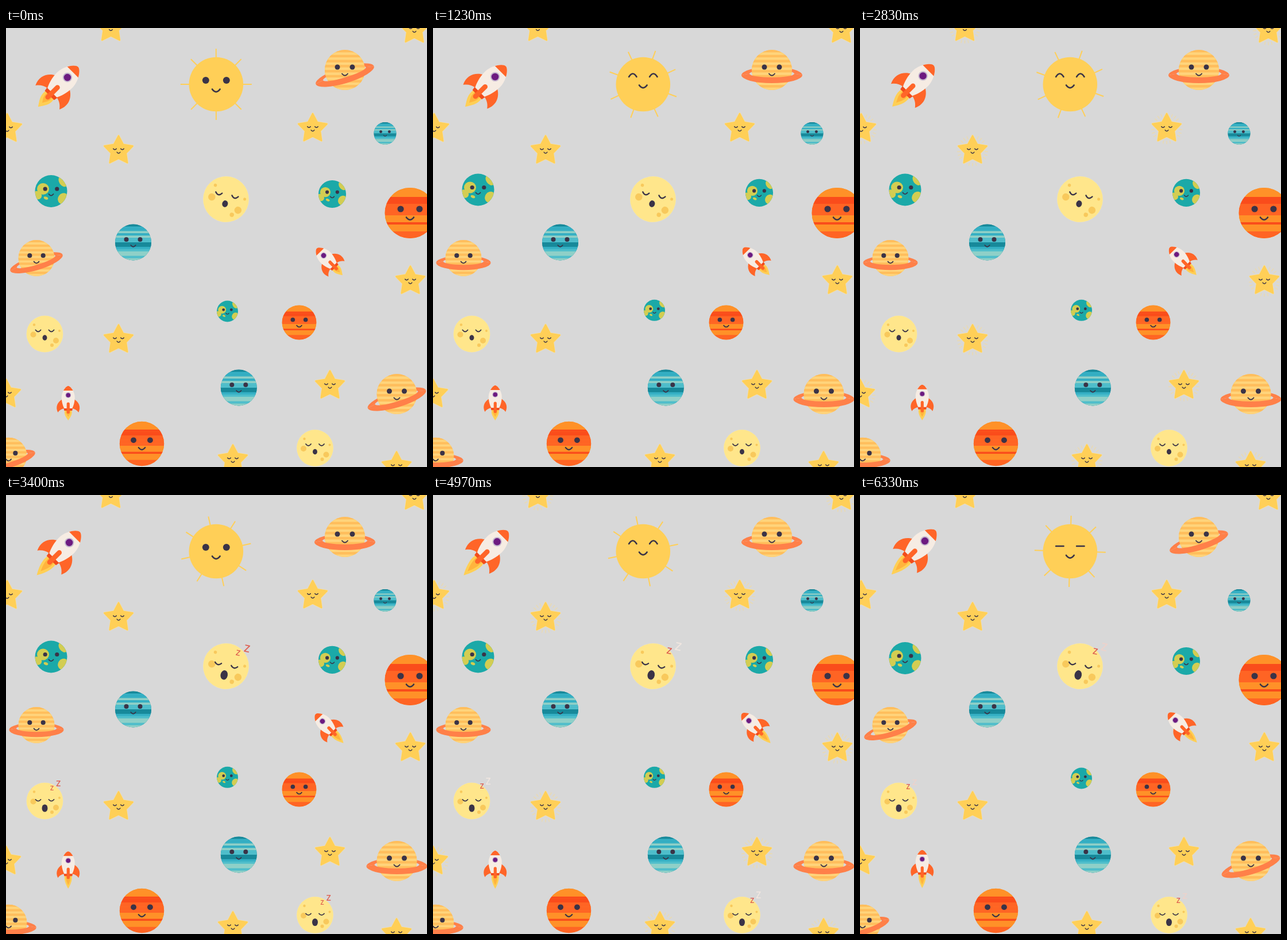
These frames come from a looping animation (733x764 px, 6.36 s). An HTML page with a canvas:

```html
<!DOCTYPE html>
<html>
<head>
<meta charset="utf-8">
<style>
html, body { margin: 0; width: 100%; height: 100%; overflow: hidden; background: #d8d8d8; }
canvas { display: block; }
</style>
</head>
<body>
<canvas id="stage" width="733" height="764"></canvas>
<script>
const c = document.getElementById('stage').getContext('2d');
const LOOP = 6360, TAU = Math.PI * 2, DEG = Math.PI / 180;
const INK = '#3a3347', YELLOW = '#ffcf57', ORANGE = '#ff6528';

// Smooth step from 0 to 1 between two times
function ramp(t, from, to) {
  const k = Math.min(1, Math.max(0, (t - from) / (to - from)));
  return k * k * (3 - 2 * k);
}
const pulse = (t, a, b, d, e) => ramp(t, a, b) - ramp(t, d, e);

function at(x, y, scale, angle, draw) {
  c.save();
  c.translate(x, y);
  c.rotate(angle * DEG);
  c.scale(scale, scale);
  draw();
  c.restore();
}

function oval(x, y, rx, ry, color, tilt = 0) {
  c.fillStyle = color;
  c.beginPath();
  c.ellipse(x, y, rx, ry, tilt, 0, TAU);
  c.fill();
}
const dot = (x, y, r, color) => oval(x, y, r, r, color);

function fillPath(d, color) {
  c.fillStyle = color;
  c.fill(new Path2D(d));
}

function line(x0, y0, x1, y1, color, width, cap = 'butt') {
  c.strokeStyle = color;
  c.lineWidth = width;
  c.lineCap = cap;
  c.beginPath();
  c.moveTo(x0, y0);
  c.lineTo(x1, y1);
  c.stroke();
}

function spoke(angle, from, to, color, width) {
  const x = Math.sin(angle), y = -Math.cos(angle);
  line(from * x, from * y, to * x, to * y, color, width);
}

// Positive depth is a smile, negative an arch
function curve(x, y, half, depth, width) {
  c.strokeStyle = INK;
  c.lineWidth = width;
  c.lineCap = 'round';
  c.beginPath();
  c.moveTo(x - half, y);
  c.quadraticCurveTo(x, y + 2 * depth, x + half, y);
  c.stroke();
}

function face(dx, y, r, smileY, half, width) {
  dot(-dx, y, r, INK);
  dot(dx, y, r, INK);
  curve(0, smileY, half, half * 0.65, width);
}

function globe(r, base, paint) {
  c.save();
  dot(0, 0, r, base);
  c.clip();
  paint();
  c.restore();
}

// One letter per stripe, all stripes equally high
function striped(r, letters, palette) {
  globe(r, palette[letters[0]], () => {
    const h = 2 * r / letters.length;
    [...letters].forEach((key, i) => {
      c.fillStyle = palette[key];
      c.fillRect(-r, i * h - r, 2 * r, h + 0.3);
    });
  });
}

function star(glow) {
  c.beginPath();
  for (let i = 0; i < 10; i++) {
    const a = i * TAU / 10, r = i % 2 ? 13.5 : 26;
    c.lineTo(r * Math.sin(a), -r * Math.cos(a));
  }
  c.closePath();
  c.lineJoin = 'round';
  c.strokeStyle = '#f6dfa6';
  c.lineWidth = 3.8;
  c.stroke();
  c.strokeStyle = c.fillStyle = YELLOW;
  c.lineWidth = 2.4;
  c.stroke();
  c.fill();
  curve(-6.5, -3.5, 2.8, 1.7, 1.4);
  curve(6.5, -3.5, 2.8, 1.7, 1.4);
  curve(0, 2.6, 2.8, 1.9, 1.5);
  c.globalAlpha = glow * 0.65;
  for (let i = 0; i < 5; i++)
    for (const off of [-14, 0, 14]) spoke((36 + 72 * i + off) * DEG, 21.5, 27, '#f7dc94', 1.3);
  c.globalAlpha = 1;
}

function sun(t) {
  for (let i = 0; i < 8; i++) spoke(i * TAU / 8 - t / LOOP * TAU, 46, 62, YELLOW, 2);
  dot(0, 0, 47.3, YELLOW);
  const joy = pulse(t % 3180, 980, 1120, 3085, 3180);
  const lift = Math.max(0, (joy - 0.3) / 0.7);
  for (const x of [-18, 18]) {
    if (joy < 0.2) oval(x, -7, 6, 6 - joy * 25, INK);
    else curve(x, -9 - 4 * lift, 6.7, -5.5 * lift, 2.6);
  }
  curve(0, 8.5 - 7 * joy, 6.8, 4.6, 2.7);
}

function saturn(tilt) {
  const halfRing = from => at(0, 9, 1, tilt, () => {
    c.fillStyle = '#ff8049';
    c.beginPath();
    c.ellipse(0, 0, 53, 14, 0, from, from + Math.PI);
    c.ellipse(0, -2.5, 39, 6.5, 0, from + Math.PI, from, true);
    c.fill();
  });
  halfRing(Math.PI);
  striped(35, 'gs'.repeat(8), { g: '#ffbe5c', s: '#ffd47b' });
  halfRing(0);
  face(13, -5, 4.5, 6.5, 5, 2);
}

function earth() {
  globe(28, '#1ba9a8', () => {
    const land = (...shape) => oval(...shape.slice(0, 4), '#d3cd52', shape[4]);
    land(-14, -4, 10.5, 10, 0);
    land(-24, 7, 8, 7, 0.6);
    land(-9, 12, 4, 2.4, 0.4);
    land(21, -17, 7, 10, -0.6);
    land(21, 13, 9, 10, 0.6);
  });
  face(10.3, -4, 3.6, 5, 4, 1.8);
}

function uranus() {
  striped(31.5, 'dbblblccddbcllcl', { d: '#17899a', b: '#35b0c4', l: '#8fd0c8', c: '#4fbecb' });
  face(12, -5, 4, 5, 4.2, 1.8);
}

function jupiter() {
  striped(44, 'oooorrrbbbbbooorooobbb', { o: '#ff9128', r: '#fa4c1b', b: '#ff6424' });
  face(16.4, -7, 5.6, 7.5, 6.5, 2.6);
}

const mix = (a, b, k) => `rgb(${a.map((v, i) => Math.round(v + (b[i] - v) * k))})`;

function snore(age) {
  const k = (age - 430) / 770;
  if (k < 0 || k > 1) return;
  c.globalAlpha = pulse(age, 400, 580, 1160, 1210);
  c.fillStyle = mix([221, 92, 78], [240, 231, 225], ramp(age, 950, 1150));
  c.font = `600 ${9 + 7 * k}px "Open Sans", sans-serif`;
  c.textAlign = 'center';
  c.textBaseline = 'middle';
  c.fillText('Z', 7.5 + 23 * k, -17 - 17 * k);
  c.globalAlpha = 1;
}

function moon(t) {
  const phase = t % 1400, open = pulse(phase, 200, 400, 850, 1000);
  dot(0, 0, 32, '#f8e6a6');
  dot(0, 0, 31.4, '#ffe68b');
  for (const [x, y, r] of [[-20, 1, 5], [19.5, 11.5, 5], [12.5, 19.5, 3], [-18.5, -16, 2.2], [25.5, -5.5, 2]])
    dot(x, y, r, '#f8c95c');
  for (const x of [-11.5, 11.5]) curve(x, -7 + 4.5 * open, 4.5, 3 - open * 0.4, 1.9);
  oval(0, 6.5 + 6 * open, 4 + open, 4.7 + 1.9 * open, INK);
  snore(phase);
  snore(phase + 370);
}

function rocket(t) {
  const rise = 5.2 * t / LOOP;
  const tip = 60 + rise * 0.9 + 2.8 * Math.max(0, Math.cos(TAU * (t / 1520 - 0.33)));
  c.translate(0, -rise);
  fillPath(`M-6 42C-8 50-3 ${tip - 5} 0 ${tip}C3 ${tip - 5} 8 50 6 42Z`, '#ffcf55');
  fillPath(`M-3.5 42C-5 48-2 ${tip - 10} 0 ${tip - 6}C2 ${tip - 10} 5 48 3.5 42Z`, '#ffb43d');
  fillPath('M-8 37H8L7 43H-7Z', '#f24c1c');
  for (const side of [-1, 1]) {
    c.save();
    c.scale(side, 1);
    fillPath('M10 23C18 27 23 36 18 46C15 42 12 40 7 39Z', ORANGE);
    c.restore();
  }
  c.save();
  c.clip(new Path2D('M0 0C4 0 11.5 10 11.5 20C11.5 28 9 35 7 39H-7C-9 35-11.5 28-11.5 20C-11.5 10-4 0 0 0Z'));
  c.fillStyle = '#f6ece3';
  c.fillRect(-13, 0, 26, 42);
  c.fillStyle = ORANGE;
  c.fillRect(-13, 0, 26, 8);
  c.restore();
  dot(0, 16, 5, '#c3b5cd');
  dot(0, 16, 3.8, '#6d1a80');
  line(0, 31, 0, 45.5, ORANGE, 5.2, 'round');
}

const STARS = [
  [182.5, 0], [711, 3], [2, 175.5], [534, 175], [196, 213.5], [704, 440.5],
  [196, 542.5], [564, 622.5], [0, 637.5], [395, 751.5], [680, 763.5]
];

function frame(now) {
  const t = now % LOOP, beat = t % 2120;
  const level = pulse(beat, 0, 420, 1840, 2090);
  const glow = pulse(beat, 250, 500, 1110, 1210);

  c.fillStyle = '#d8d8d8';
  c.fillRect(0, 0, 733, 764);
  const place = (spots, draw) => {
    for (const [x, y, scale = 1, angle = 0] of spots) at(x, y, scale, angle, draw);
  };
  place(STARS, () => star(glow));
  place([[365.8, 98]], () => sun(t));
  place([[590, 73], [53, 400.5, 0.9], [680.5, 637], [4.5, 744.5, 0.91]], () => saturn(17 * (level - 1)));
  place([[78.5, 284], [568, 289, 0.86], [385.5, 493, 0.66]], () => {
    c.translate(0, -2.5 * level);
    earth();
  });
  place([[221.5, 373], [405.3, 626], [660, 183.5, 0.62]], uranus);
  place([[703.5, 322], [510.5, 512.5, 0.68], [236.5, 723.5, 0.88]], jupiter);
  place([[383, 298, 1.25, 12], [67.5, 532.5], [538, 731]], () => moon(t));
  place([[125.5, 67.5, 1.64, 45], [541, 383.5, 1.08, -44], [108.3, 623]], () => rocket(t));
}

const start = performance.now();
(function tick() {
  frame(performance.now() - start);
  requestAnimationFrame(tick);
})();
</script>
</body>
</html>
```
